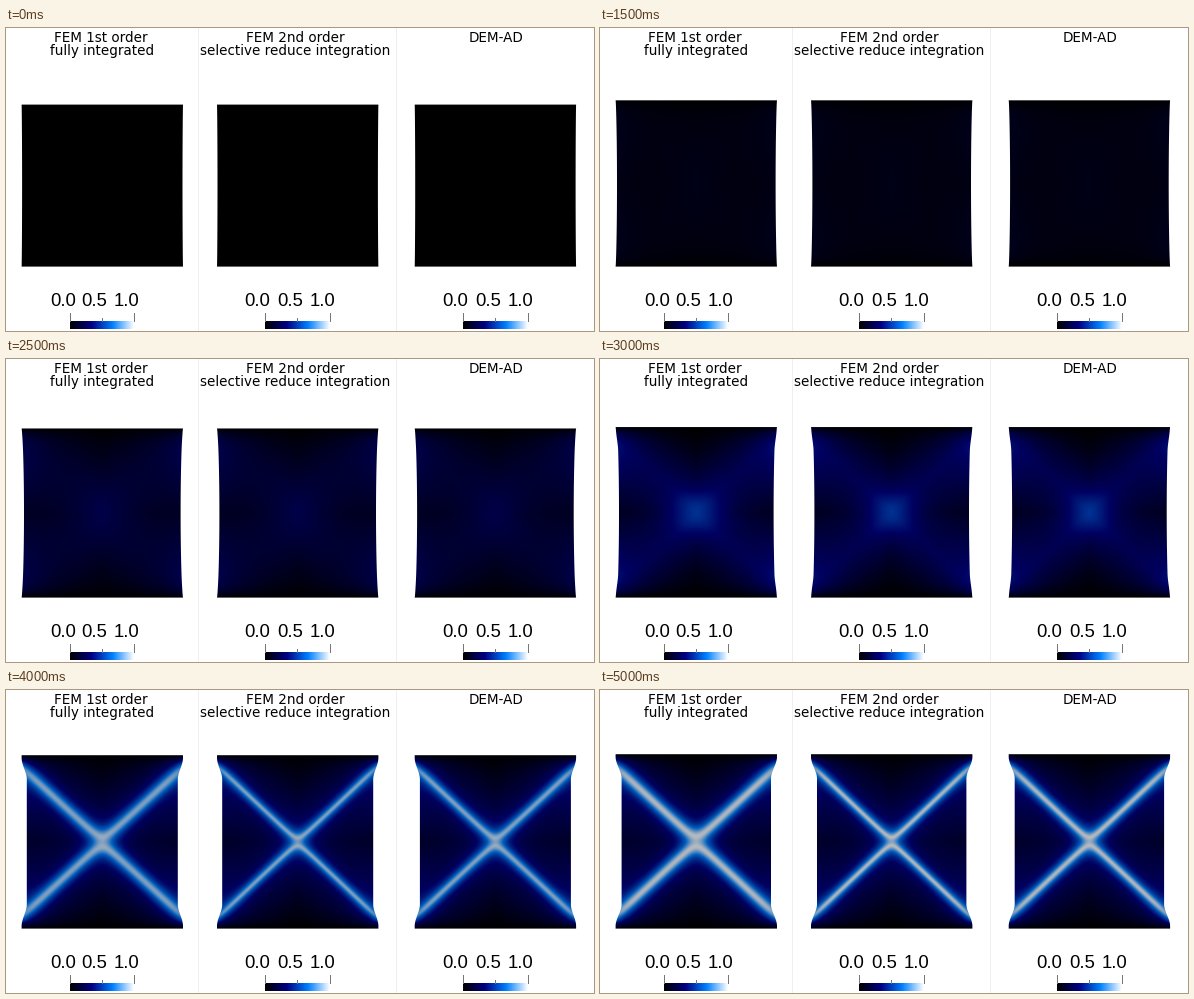
Recreate the animation shown at these times as a matplotlib script. Size 588 px wide and 303 px high, loop 5.5 s.

```python
import numpy as np
import matplotlib.pyplot as plt
from matplotlib.animation import FuncAnimation
from matplotlib.colors import LinearSegmentedColormap
from matplotlib.patches import Rectangle

W, H, DPI = 588, 303, 100
STEPS, INTERVAL = 11, 500
BOTTOM = 238.6       # clamped lower edge of every specimen
HALF = 80.7          # half width of a specimen
SHADE = 0.75         # surface lighting
Y0, Y1 = 60, 242     # rows covered by the field images

CMAP = LinearSegmentedColormap.from_list(
    "damage", [(0, (0, 0, 0)), (1 / 3, (0, 0, 0.502)),
               (2 / 3, (0, 0.502, 1)), (1, (1, 1, 1))], N=1024)

# centre, bar start, bar length, crack slope, core radius, decay length,
# half gap between the two crack apexes, hot spot width
PANELS = [
    dict(cx=96.3, bar=64.2, span=63.8, slope=0.86, core=4.0, decay=4.5, gap=5, spot=0.40),
    dict(cx=291.7, bar=259, span=65, slope=0.88, core=1.6, decay=4.0, gap=4, spot=0.33),
    dict(cx=489.4, bar=457, span=65, slope=0.87, core=2.2, decay=4.2, gap=4, spot=0.31),
]
TITLES = [
    (94.5, 14, "FEM 1st order"), (96.5, 27.5, "fully integrated"),
    (289.5, 14, "FEM 2nd order"), (289.5, 27.5, "selective reduce integration"),
    (489.5, 14, "DEM-AD"),
]


def ramp(n, steps, values):
    return float(np.interp(n, steps, values))


def smooth(x):
    x = np.clip(x, 0, 1)
    return x * x * (3 - 2 * x)


def state(n):
    """Load-dependent quantities at load step n."""
    return dict(
        top=ramp(n, [0, 8, 9, 10], [76.6, 65.2, 64.3, 64.2]),
        inset=ramp(n, [0, 2, 4, 5, 6, 8, 10], [0.5, 1, 1.8, 2.4, 3.4, 5.2, 6]),
        base=min(0.0088 * n * n, 0.31),
        reach=ramp(n, [2, 4, 6, 8], [1.4, 0.85, 0.6, 0.66]),
        spot=ramp(n, [4, 5, 6, 7, 8], [0, 0.03, 0.15, 0.1, 0]),
        crack=ramp(n, [5, 6, 7, 8, 9, 10], [0, 0.05, 0.55, 0.85, 0.93, 0.96]),
        spread=ramp(n, [6, 7, 8, 10], [2, 1.4, 1, 1]),
        local=smooth((n - 4.5) / 3.5),
    )


def field(panel, n):
    """RGB image of one stretched specimen on white."""
    s = state(n)
    left = int(panel["cx"] - 84)
    x = np.arange(left, left + 170) + 0.5 - panel["cx"]
    y = np.arange(Y0, Y1) + 0.5
    mid, half = (s["top"] + BOTTOM) / 2, (BOTTOM - s["top"]) / 2
    x, y = np.meshgrid(x, y - mid)
    u, v = x / HALF, y / half

    # diffuse damage, fading away from the diagonals, slower towards the sides
    k = panel["slope"]
    off = np.abs(v) - k * np.abs(u)
    reach = s["reach"] * np.where(off > 0, 1, 1.3)
    base = s["base"] * np.exp(-(off / reach) ** 2)
    base *= 1 - 0.22 * np.sin(np.pi * np.clip(np.abs(u), 0, 1)) + 0.25 * u ** 6
    base += s["spot"] * np.exp(-(u / panel["spot"]) ** 2 - (v / 0.24) ** 2)

    # two V-shaped cracks meeting in the middle
    m = k * half / HALF
    r, decay = panel["core"], panel["decay"] * s["spread"]
    intact = 1 - base
    for sign in (-1, 1):
        dist = (sign * y - np.hypot(panel["gap"], m * x)) / np.hypot(1, m)
        intact *= 1 - s["crack"] * np.exp(-(np.hypot(dist, r) - r) / decay)
    clamp = 1 - np.clip(np.abs(v), 0, 1) ** 12
    rgb = CMAP(np.clip((1 - intact) * clamp, 0, 1))[..., :3] * SHADE

    # outline: necking sides between the clamped edges
    bow = np.clip(1 - v * v, 0, 1) ** 0.7
    shear = smooth((0.97 - np.abs(v)) / 0.25)
    side = HALF - s["inset"] * (bow + (shear - bow) * s["local"])
    cover = (np.clip(side - np.abs(x) + 0.5, 0, 1)
             * np.clip(half - np.abs(y) + 0.5, 0, 1))[..., None]
    return 1 + (rgb - 1) * cover, (left, left + 170, Y1, Y0)


fig = plt.figure(figsize=(W / DPI, H / DPI), dpi=DPI, facecolor="white")
ax = fig.add_axes([0, 0, 1, 1])


def label(x, y, text, size, font):
    ax.text(x, y, text, fontsize=size * 72 / DPI, family=font,
            color="black", ha="center", va="baseline")


def rule(x, y0, y1, color):
    ax.add_patch(Rectangle((int(x), y0), 1, y1 - y0, fc=color, lw=0))


def colour_bar(panel):
    x0, span = panel["bar"], panel["span"]
    ax.imshow(np.linspace(0, 1, 256)[None], cmap=CMAP, aspect="auto",
              extent=(x0, x0 + span, 301, 293), interpolation="bilinear")
    for value in (0, 0.5, 1):
        x = x0 + value * span
        rule(x, 290 if value == 0.5 else 285, 294, "#777777")
        label(x - 7.5, 278, f"{value:.1f}", 18.5, "Liberation Sans")


images = []
for p in PANELS:
    rgb, extent = field(p, 0)
    images.append(ax.imshow(rgb, extent=extent, aspect="auto",
                            interpolation="nearest"))
    colour_bar(p)
for x, y, text in TITLES:
    label(x, y, text, 13.5, "DejaVu Sans")
for x in (192, 390):
    rule(x, 0, H, "#efefef")
ax.set(xlim=(0, W), ylim=(H, 0))
ax.axis("off")


def update(n):
    for image, p in zip(images, PANELS):
        image.set_data(field(p, n)[0])
    return images


anim = FuncAnimation(fig, update, frames=STEPS, interval=INTERVAL,
                     repeat=True, repeat_delay=0, blit=False)
plt.show()
```
